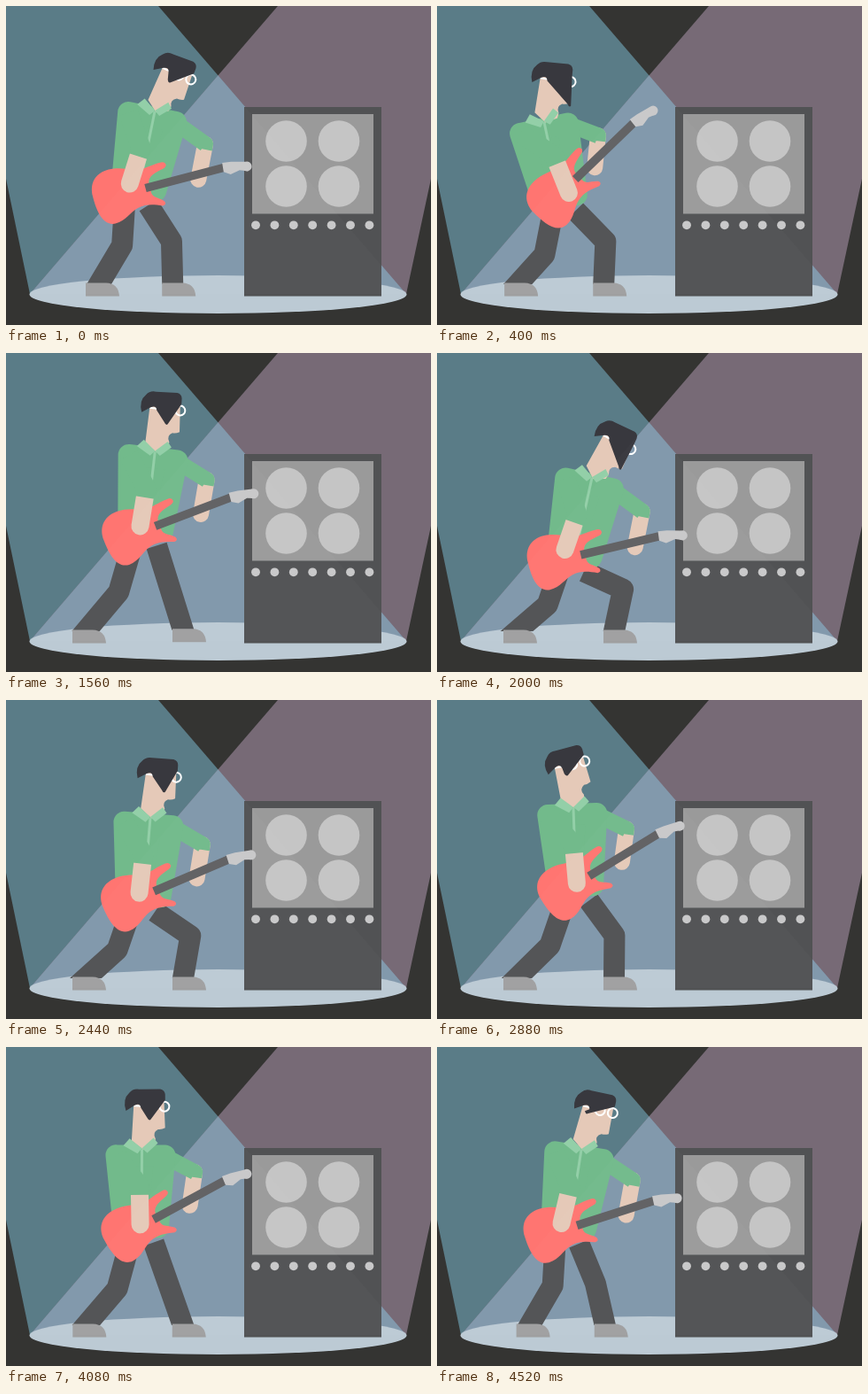
Animation, 480 px wide and 360 px high, one loop 4.56 s. Source, as an HTML page with a canvas:

```html
<!DOCTYPE html>
<html lang="en">
<head>
<meta charset="utf-8">
<title>Guitarist on stage</title>
<style>
html, body { margin: 0; width: 100%; height: 100%; overflow: hidden; background: #343432; }
canvas { display: block; }
</style>
</head>
<body>
<canvas id="stage" width="480" height="360"></canvas>
<script>
const c = document.getElementById('stage').getContext('2d');
const LOOP = 4560, STEP = 40, RAD = Math.PI / 180;
const SHIRT = '#72ba8b', TRIM = '#93cfa8', SKIN = '#e5c9b8', RED = '#ff7571',
      DARK = '#515254', HAIR = '#38383e', SHOE = '#9f9fa0', PALE = '#c8c8c9';

// Key poses: time, neck x and y, body lean, head nod, fringe flop.
// Guitar, arms and legs follow from these.
const poses = [
  [0, 168, 119, 11.5, 20, .15],
  [400, 121, 131, -12, 5, 1],
  [1160, 120, 130, -12, -21, .4],
  [1540, 167, 111, 6, 2, .4],
  [2000, 175, 141, 12.5, 25, .9],
  [2880, 154, 122, -2, -15, .1],
  [3640, 182, 131, 10, 18, .7],
  [4200, 148, 112, -1, -4, .2],
  [4520, 163, 116, 9, 12, -.1]
];

// Looping cubic through one column of the poses.
function sample(col, t) {
  const n = poses.length;
  const at = i => poses[(i + n) % n][col];
  const time = i => poses[(i + n) % n][0] + LOOP * Math.floor(i / n);
  const slope = i => (at(i + 1) - at(i - 1)) / (time(i + 1) - time(i - 1));
  let i = n - 1;
  while (poses[i][0] > t) i--;
  const h = time(i + 1) - time(i), u = (t - time(i)) / h, w = 1 - u;
  return at(i) * w * w * (1 + 2 * u) + at(i + 1) * u * u * (3 - 2 * u)
    + h * u * w * (slope(i) * w - slope(i + 1) * u);
}

// One smooth bump per loop, from 0 to 1.
function pulse(t, peak, sharp) {
  return Math.max(0, Math.cos(2 * Math.PI * (t - peak) / LOOP)) ** sharp;
}

// Point of a part's own coordinates, on the stage.
function place(p, x, y) {
  const s = Math.sin(p.a * RAD), k = Math.cos(p.a * RAD);
  return [p.x + x * k - y * s, p.y + x * s + y * k];
}

// Elbow or knee: the middle of a limb, pushed sideways.
function joint([ax, ay], [bx, by], bend) {
  const k = bend / Math.hypot(bx - ax, by - ay);
  return [(ax + bx) / 2 + (by - ay) * k, (ay + by) / 2 - (bx - ax) * k];
}

// Point at distance d from the first point towards the second.
function toward([x, y], [tx, ty], d) {
  const k = d / Math.hypot(tx - x, ty - y);
  return [x + (tx - x) * k, y + (ty - y) * k];
}

function within(p, draw) {
  c.save();
  c.translate(p.x, p.y);
  c.rotate((p.a || 0) * RAD);
  draw();
  c.restore();
}

function poly(color, ...pts) {
  c.fillStyle = color;
  c.beginPath();
  pts.forEach(p => c.lineTo(...p));
  c.closePath();
  c.fill();
}

function line(color, width, cap, ...pts) {
  c.strokeStyle = color;
  c.lineWidth = width;
  c.lineCap = cap;
  c.lineJoin = 'round';
  c.beginPath();
  pts.forEach(p => c.lineTo(...p));
  c.stroke();
}

function shape(color, d) {
  c.fillStyle = color;
  c.fill(new Path2D(d));
}

function rect(color, x, y, w, h) {
  c.fillStyle = color;
  c.fillRect(x, y, w, h);
}

function oval(color, x, y, rx, ry = rx) {
  c.fillStyle = color;
  c.beginPath();
  c.ellipse(x, y, rx, ry, 0, 0, 7);
  c.fill();
}

function drawStage() {
  rect('#343432', 0, 0, 480, 360);
  poly('#5a7c87', [0, 0], [172, 0], [452, 325], [27, 325], [0, 195]);
  poly('#776a76', [480, 0], [307, 0], [27, 325], [452, 325], [480, 195]);
  poly('#8097ab', [239.5, 78.3], [27, 325], [452, 325]);
  oval('#bccad4', 239.5, 325.5, 213, 21.5);
}

function drawAmp() {
  rect(DARK, 269, 114, 155, 213.5);
  rect('#9a9a9a', 278, 122, 137, 112.5);
  for (const x of [316.5, 376])
    for (const y of [152.5, 203.5]) oval('#c5c5c5', x, y, 23.3);
  for (let i = 0; i < 7; i++) oval(PALE, 282 + i * 21.4, 247.3, 4.9);
}

function drawLeg(hip, knee, foot, ankle) {
  c.save();
  c.beginPath();
  c.rect(0, 0, 480, foot.y - 13);
  c.clip();
  line(DARK, 24, 'butt', hip, knee, toward(knee, ankle, 80));
  c.restore();
  within(foot, () => shape(SHOE, 'M0 .5V-14.5H23Q37 -14 38 .5Z'));
}

function drawLegs(t, body) {
  const back = { x: 75 + 15 * pulse(t, 0, 16), y: 327 };
  const front = { x: 188 - 16 * pulse(t, 200, 8), y: 327 - 15 * pulse(t, 1160, 16) };
  const hipF = place(body, 14, 105), hipB = place(body, -13, 105);
  const ankleF = [front.x + 12, front.y - 13], ankleB = [back.x + 15, back.y - 13];
  const span = Math.hypot(hipF[0] - ankleF[0], hipF[1] - ankleF[1]) / 2;
  const bend = Math.sqrt(Math.max(0, 48.5 ** 2 - span ** 2));
  drawLeg(hipF, joint(hipF, ankleF, bend), front, ankleF);
  drawLeg(hipB, joint(hipB, ankleB, 12), back, ankleB);
}

function drawArm(shoulder, hand, bend, skin, sleeve, cuff) {
  const elbow = joint(shoulder, hand, -bend);
  line(SKIN, skin, 'round', elbow, hand);
  line(SHIRT, sleeve, 'butt', shoulder, elbow, toward(elbow, hand, cuff));
}

function drawTorso() {
  const pts = [[-29, 7], [26, 7], [19, 88], [-20, 88]];
  poly(SHIRT, ...pts);
  line(SHIRT, 24, 'round', ...pts, pts[0]);
  line(TRIM, 3, 'butt', [0, 0], [0, 88]);
}

function drawCollar() {
  poly(TRIM, [-21, -4], [-14, -12], [0, -1], [-5, 5]);
  poly(TRIM, [0, -1], [13, -13], [18, -7], [6, 4]);
}

function drawHead(flop) {
  c.translate(24.5, -66.7);
  shape(SKIN, 'M1 8L2 43Q-2 45 -6 44.5Q-13 48 -9 55L-10 61L-23 67L-36 57L-33 15Z');
  line('#fff', 2, 'butt', [-33, 17.5], [-19, 18.5]);
  for (const x of [-13, 1.5]) {
    c.beginPath();
    c.arc(x, 18.8, 5.5, 0, 7);
    c.stroke();
  }
  const x = 27 * flop - 25, y = 28 + 19 * flop;
  shape(HAIR, `M-42 23Q-46 10 -38 3Q-34 -2 -27 -1L-3 -1Q2 0 2.5 5L2.5 11.5
    L${x + 2} ${y - 1}Q${x} ${y + 1} ${x - 2} ${y - 3}L-25 20Q-26 14 -32 17Z`);
}

function drawGuitar() {
  shape(RED, `M29 -19.5Q29 -24 24 -24C10 -24 6 -21 -3 -23C-14 -25 -22 -31 -35 -31
    C-52 -31 -60 -20 -60 -6C-60 10 -58 29 -43 30C-30 30 -24 22 -14 19.5
    C-4 17 4 20 14 24Q19 24 17 19.5C11 13 6 13 5 7L5 -5C7 -13 14 -14 25 -16.5Q28 -17 29 -19.5Z`);
  rect('#606163', 0, -5, 93, 9.5);
  shape(PALE, 'M91 -6L101 -4.5L117 -.5L117 10.5L108 7L97 9L90 4.5Z');
  oval(PALE, 117, 5, 5.5);
}

function draw(t) {
  const [x, y, lean, nod, flop] = [1, 2, 3, 4, 5].map(col => sample(col, t));
  const body = { x, y, a: lean };
  const [gx, gy] = place(body, 14 - .6 * lean, 79 + .7 * lean);
  const guitar = { x: gx, y: gy, a: 1.25 * lean - 29 };
  drawStage();
  drawAmp();
  drawLegs(t, body);
  drawArm(place(body, 26, 8), place(guitar, 43 + 1.5 * lean, 5.5), -22, 18, 18, 6);
  within(body, drawTorso);
  within({ x, y, a: nod }, () => drawHead(flop));
  within(body, drawCollar);
  within(guitar, drawGuitar);
  drawArm(place(body, -29, 7), place(guitar, -16, -2 - .65 * lean), -13.5, 20, 22, 10);
  poly('rgba(255,255,255,.015)', [239.5, 78.3], [27, 325], [452, 325]);
}

const start = performance.now();
function frame() {
  const t = (performance.now() - start) % LOOP;
  draw(Math.floor(t / STEP) * STEP);
  requestAnimationFrame(frame);
}
frame();
</script>
</body>
</html>
```
